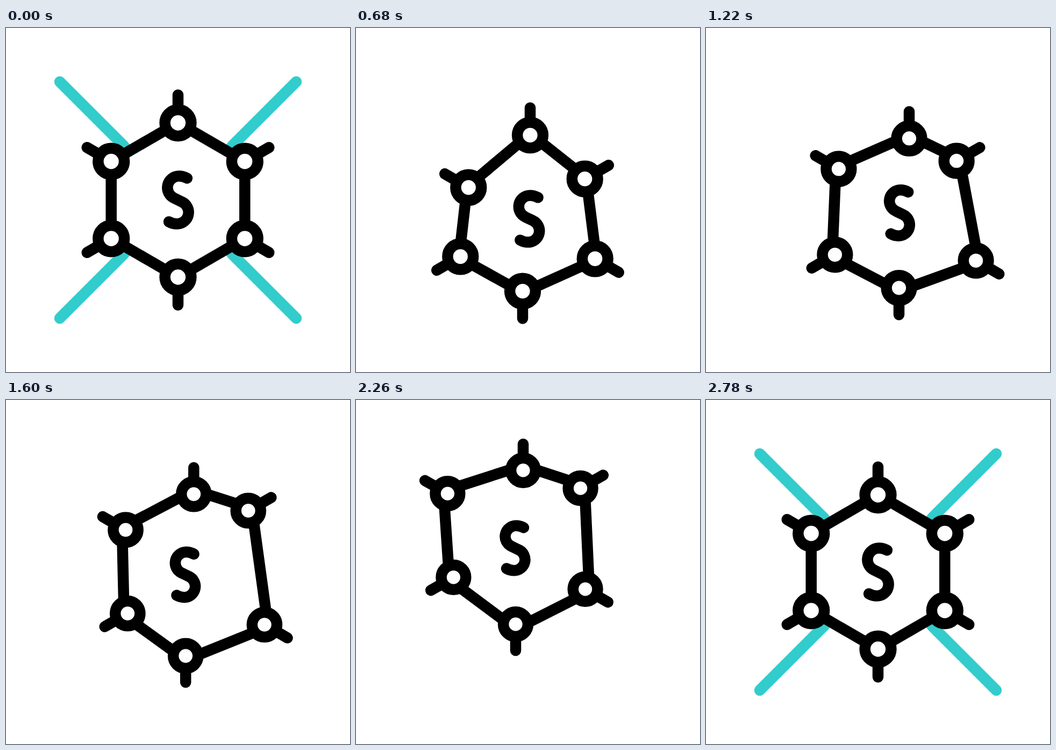
These frames come from a looping animation (640 by 640 pixels, 3600 ms). An HTML page:

```html
<!DOCTYPE html>
<html lang="en">
<head>
<meta charset="utf-8">
<title>Molecule</title>
<style>
html, body { margin: 0; width: 100%; height: 100%; overflow: hidden; background: #fff; }
svg { display: block; width: 100%; height: 100%; }
path { stroke-linecap: round; }
</style>
</head>
<body>
<svg viewBox="0 0 640 640">
  <path id="rays" fill="none" stroke="#33cccc" stroke-width="20.5"/>
  <path id="bonds" fill="none" stroke="#000" stroke-width="20.5"/>
  <g id="atoms" fill="#fff" stroke="#000"></g>
  <path id="letter" fill="none" stroke="#000"
    d="M17-40.5Q9.5-44.5 2-44.5A21.5 21.5 0 0 0-7-3.4L7 3.4A21.5 21.5 0 0 1-2 44.5Q-10 44.5-17 40.5"/>
</svg>
<script>
const LOOP = 3600, STEP = 20, START = 400, END = 2780;
const MID = 320, RADIUS = 143.5, RING = 24.4, STICK = 52, WIDTH = 20.5;
const get = id => document.getElementById(id);
const clamp = v => Math.min(1, Math.max(0, v));
const ease = u => u * u * (3 - 2 * u);

// Smooth curve through the keys without overshoot, settling at the end
function curve(ts, vs) {
  const last = ts.length - 1;
  const rate = i => (vs[i + 1] - vs[i]) / (ts[i + 1] - ts[i]);
  const slopes = vs.map((_, i) => {
    if (i === 0) return rate(0) * 1.2;
    if (i === last) return 0;
    const a = rate(i - 1), b = rate(i);
    return a * b <= 0 ? 0 : 2 * a * b / (a + b);
  });
  return t => {
    if (t <= START || t >= END) return 0;
    let i = 0;
    while (t > ts[i + 1]) i++;
    const h = ts[i + 1] - ts[i], u = (t - ts[i]) / h, w = 1 - u;
    return w * w * ((1 + 2 * u) * vs[i] + u * h * slopes[i]) +
           u * u * ((3 - 2 * u) * vs[i + 1] - w * h * slopes[i + 1]);
  };
}

// A wander that leaves its place at START and is back at END
function wander(times, points) {
  const ts = [START, ...times, END];
  const axis = j => curve(ts, [0, ...points.map(p => p[j]), 0]);
  const x = axis(0), y = axis(1);
  return t => [x(t), y(t)];
}

const drift = wander(
  [680, 950, 1220, 1360, 1600, 1800, 2260, 2560],
  [[2, 35], [3, 49], [40, 24], [47, 16], [13.5, 5], [-18.5, 2], [-24, -44.5], [-6, -9]]
);

// Each atom, clockwise from the top, strays from its corner
const sways = [
  [[2, -15], [18, -1], [15, -19], [15, -10]],
  [[-18, -4], [-13, -28], [4, -57], [5, -44]],
  [[1, 4], [23, 20], [31, 26], [14, 9]],
  [[-12, -6], [-1, 2], [1, 19], [1, 7]],
  [[-6, 0], [-1, 9], [14, 0], [2, -13]],
  [[9, 12], [6, -13], [7, -17], [-9, -34]]
].map(points => wander([680, 1220, 1800, 2260], points));

const atoms = sways.map((sway, i) => {
  const a = (i * 60 - 90) * Math.PI / 180, c = Math.cos(a), s = Math.sin(a);
  const el = document.createElementNS("http://www.w3.org/2000/svg", "g");
  el.innerHTML = `<path d="M${c * RING} ${s * RING}L${c * STICK} ${s * STICK}"/><circle r="${RING}"/>`;
  get("atoms").appendChild(el);
  return { el, sway, c: c * RADIUS, s: s * RADIUS };
});

function scaleAt(t) {
  const u = clamp((t - START) / (END - START));
  return 1 - 0.083 * u ** 0.65 * Math.min(1, 4 * (1 - u));
}

// Shapes shrink while their lines keep their weight
function place(el, x, y, k) {
  el.setAttribute("transform", `translate(${x} ${y}) scale(${k})`);
  el.setAttribute("stroke-width", WIDTH / k);
}

function bond([ax, ay], [bx, by]) {
  const f = RING / Math.hypot(bx - ax, by - ay);
  const ux = (bx - ax) * f, uy = (by - ay) * f;
  return `M${ax + ux} ${ay + uy}L${bx - ux} ${by - uy}`;
}

function rays(t) {
  const grown = ease(clamp(Math.max(START + 200 - t, t - END + 200) / 200));
  if (!grown) return "";
  const near = 100, far = near + 120 * grown;
  let d = "";
  for (const sx of [-1, 1]) for (const sy of [-1, 1])
    d += `M${MID + sx * near} ${MID + sy * near}L${MID + sx * far} ${MID + sy * far}`;
  return d;
}

function draw(t) {
  const k = scaleAt(t), [dx, dy] = drift(t);
  const x = MID + dx, y = MID + dy;
  // Bonds join the full-size corners, atoms sit on the shrunken ones
  const corners = atoms.map(({ el, sway, c, s }) => {
    const [sx, sy] = sway(t);
    place(el, x + c * k + sx, y + s * k + sy, k);
    return [x + c + sx, y + s + sy];
  });
  get("bonds").setAttribute("d", corners.map((p, i) => bond(p, corners[(i + 1) % 6])).join(""));
  get("rays").setAttribute("d", rays(t));
  place(get("letter"), x, y, k);
}

const begin = performance.now();
function tick() {
  const t = (performance.now() - begin) % LOOP;
  draw(Math.floor(t / STEP) * STEP);
  requestAnimationFrame(tick);
}
tick();
</script>
</body>
</html>
```
